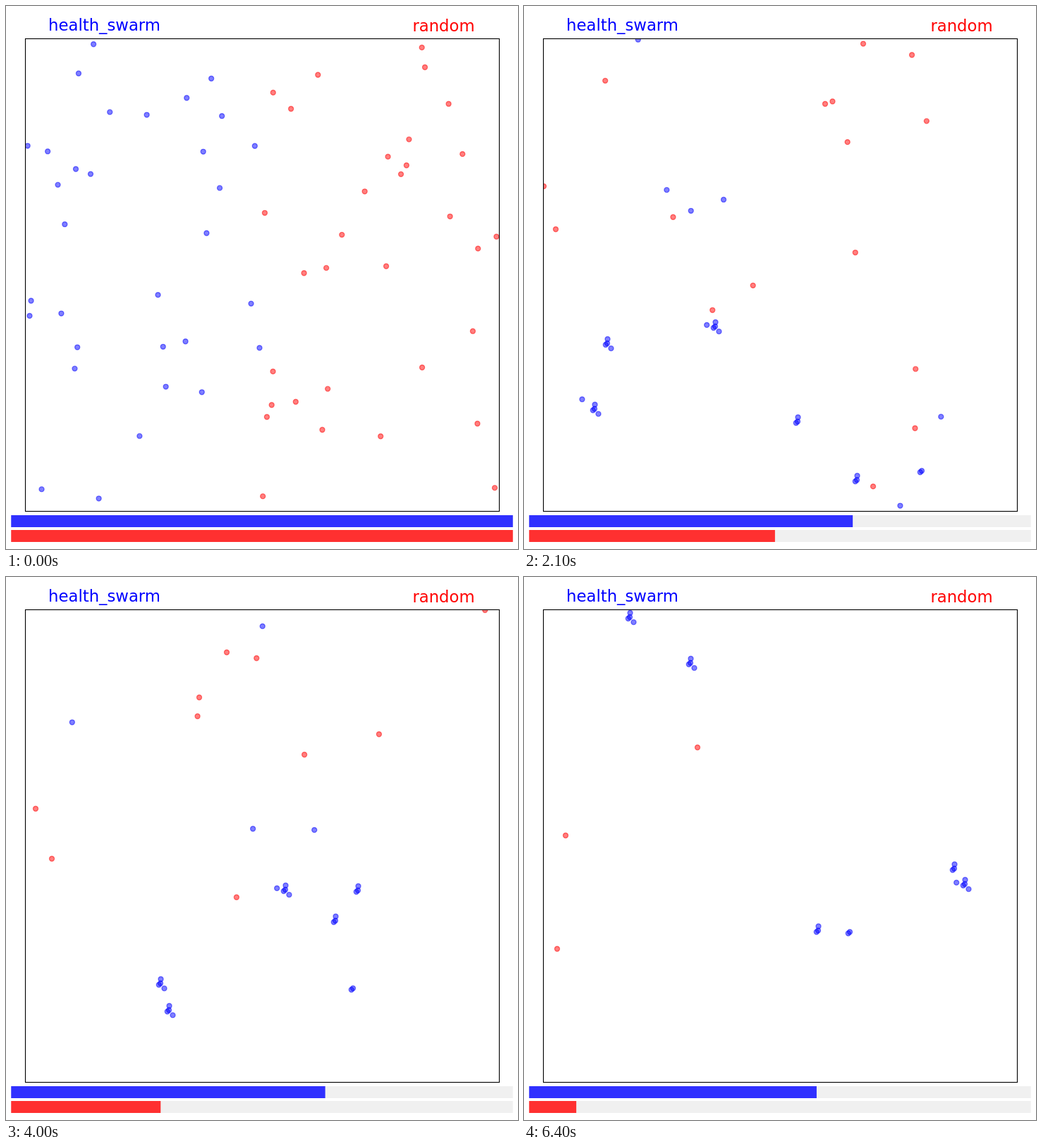
An HTML page with a canvas that plays this animation: 726x771 px, repeating every 6.45 s.

```html
<!DOCTYPE html>
<html lang="en">
<head>
<meta charset="utf-8">
<title>Swarm against random</title>
<style>
  html, body { margin: 0; width: 726px; height: 771px; overflow: hidden; background: #fff; }
  canvas, svg { position: absolute; left: 0; top: 0; display: block; }
  text { font: 22.75px "DejaVu Sans", sans-serif; text-anchor: middle; }
</style>
</head>
<body>
<canvas id="stage" width="726" height="771"></canvas>
<svg width="726" height="771">
  <text x="139.5" y="35" fill="#00f">health_swarm</text>
  <text x="620.5" y="36" fill="#f00">random</text>
</svg>
<script>
const ctx = document.getElementById('stage').getContext('2d');
const LOOP = 6450, STEP = 50, CROWD = 32;
const BOX = { x: 27.5, y: 46.5, size: 671 };
const BAR = { x: 7.26, width: 711.48, height: 17 };

const PATH_TIMES = [0, 2100, 4000, 6400];
const HEALTH_TIMES = [0, 1200, 2100, 2900, 4000, 5050, 6400];

// Groups steer from scattered homes through key points; the others roam.
// Points may lie outside the box and wrap around.
const teams = [
  {
    rgb: '0,0,255', bar: '#3030ff', barY: 723, side: 0, seed: 11,
    health: [1, 0.674, 0.645, 0.675, 0.626, 0.625, 0.573],
    alive: t => CROWD - 11 * t / 6400,
    groups: [
      { size: 5, path: [[271, 455], [396, 444], [625, 436]] },
      { size: 4, path: [[100, 572], [231, 615], [236, 793]] },
      { size: 4, path: [[118, 479], [219, 577], [150, 728]] },
      { size: 3, path: [[388, 590], [467, 488], [417, 502]] },
      { size: 3, path: [[472, 673], [499, 445], [610, 414]] },
      { size: 2, path: [[564, 660], [492, 584], [462, 504]] }
    ]
  },
  {
    rgb: '255,0,0', bar: '#ff3030', barY: 744, side: 0.5, seed: 47,
    health: [1, 0.63, 0.49, 0.432, 0.298, 0.225, 0.094],
    alive: t => CROWD * curve(HEALTH_TIMES, teams[1].health, t),
    groups: [
      { size: 1, path: [[427, 139], [313, 107], [246, 242]] },
      { size: 1, path: [[28, 256], [42, 329], [59, 367]] },
      { size: 1, path: [[45, 317], [65, 400], [47, 528]] }
    ]
  }
];

function seeded(seed) {
  return () => {
    seed = (seed * 16807) % 2147483647;
    return seed / 2147483647;
  };
}

// Smooth curve through timed values
function curve(times, values, t) {
  const last = times.length - 1;
  let i = 0;
  while (i < last - 1 && t >= times[i + 1]) i++;
  const slope = k => {
    const a = Math.max(k - 1, 0), b = Math.min(k + 1, last);
    return (values[b] - values[a]) / (times[b] - times[a]);
  };
  const span = times[i + 1] - times[i];
  const u = (t - times[i]) / span, u2 = u * u, u3 = u2 * u;
  return values[i] + (3 * u2 - 2 * u3) * (values[i + 1] - values[i])
    + (u3 - 2 * u2 + u) * span * slope(i)
    + (u3 - u2) * span * slope(i + 1);
}

function follower(home, path, member) {
  const angle = 2.4 * member, radius = 3 * member;
  const shift = [radius * Math.cos(angle), radius * Math.sin(angle)];
  const tracks = [0, 1].map(n => {
    const laps = Math.round((path[0][n] - home[n]) / BOX.size);
    return [home[n] + laps * BOX.size, ...path.map(p => p[n] + shift[n])];
  });
  return t => tracks.map(track => curve(PATH_TIMES, track, t));
}

function roamer(home, rand) {
  const angle = rand() * Math.PI * 2, phase = rand() * Math.PI * 2;
  const sway = s => 25 * (Math.sin(s / 500 + phase) - Math.sin(phase));
  return t => [
    home[0] + 0.09 * t * Math.cos(angle) - sway(t) * Math.sin(angle),
    home[1] + 0.09 * t * Math.sin(angle) + sway(t) * Math.cos(angle)
  ];
}

// Agents listed first live longest
function makeAgents(team) {
  const rand = seeded(team.seed * 7919), agents = [];
  const home = () => [
    BOX.x + BOX.size * (team.side + rand() / 2),
    BOX.y + BOX.size * rand()
  ];
  for (const { size, path } of team.groups) {
    for (let m = 0; m < size; m++) agents.push(follower(home(), path, m));
  }
  while (agents.length < CROWD) agents.push(roamer(home(), rand));
  return agents;
}

for (const team of teams) team.agents = makeAgents(team);

const wrap = (v, low) => low + ((v - low) % BOX.size + BOX.size) % BOX.size;

function dot([x, y], rgb) {
  ctx.beginPath();
  ctx.arc(wrap(x, BOX.x), wrap(y, BOX.y), 3.47, 0, Math.PI * 2);
  ctx.fillStyle = ctx.strokeStyle = `rgba(${rgb},0.5)`;
  ctx.lineWidth = 1.39;
  ctx.fill();
  ctx.stroke();
}

function draw(t) {
  ctx.fillStyle = '#fff';
  ctx.fillRect(0, 0, 726, 771);

  ctx.save();
  ctx.beginPath();
  ctx.rect(BOX.x, BOX.y, BOX.size + 1, BOX.size);
  ctx.clip();
  for (const team of teams) {
    const alive = Math.round(team.alive(t));
    for (const agent of team.agents.slice(0, alive)) dot(agent(t), team.rgb);
  }
  ctx.restore();

  ctx.strokeStyle = '#000';
  ctx.lineWidth = 1.11;
  ctx.strokeRect(BOX.x, BOX.y, BOX.size + 1, BOX.size);

  for (const team of teams) {
    const health = curve(HEALTH_TIMES, team.health, t);
    ctx.fillStyle = '#f0f0f0';
    ctx.fillRect(BAR.x, team.barY, BAR.width, BAR.height);
    ctx.fillStyle = team.bar;
    ctx.fillRect(BAR.x, team.barY, BAR.width * health, BAR.height);
  }
}

const begin = performance.now();
function tick() {
  const t = (performance.now() - begin) % LOOP;
  draw(Math.floor(t / STEP) * STEP);
  requestAnimationFrame(tick);
}
tick();
</script>
</body>
</html>
```
